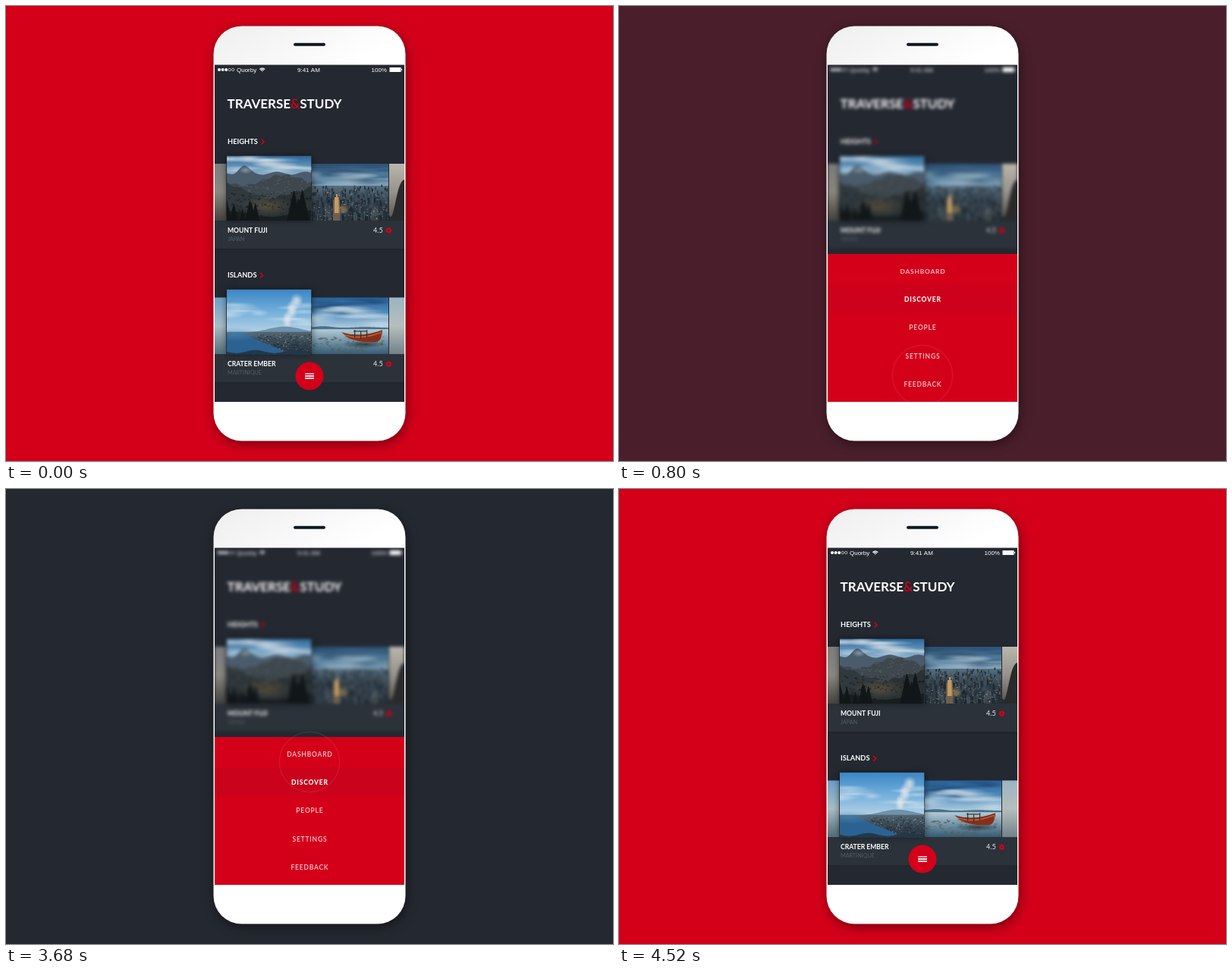
Animation of 800 by 600 pixels, one loop 6.94 s. Source, as an HTML page with a canvas:

```html
<!DOCTYPE html>
<html lang="en">
<head>
<meta charset="utf-8">
<title>Travel app menu</title>
<style>
html, body { margin: 0; width: 100%; height: 100%; overflow: hidden; background: #d4001a; }
canvas { display: block; width: 800px; height: 600px; }
</style>
</head>
<body>
<canvas id="stage" width="800" height="600"></canvas>
<script>
const LOOP = 6940, OPEN_AT = 160, TAP_AT = 3040, CLOSE_AT = 3740, SPAN = 680;
const RED = '#d4001a', DARK = '#242830', WHITE = '#fff';
const SCREEN = { x: 275, y: 77.5, w: 250, h: 444.5 };
const PANEL_TOP = 327;
const BUTTON = { x: 400, y: 488, r: 18.5 };
const ITEMS = ['DASHBOARD', 'DISCOVER', 'PEOPLE', 'SETTINGS', 'FEEDBACK'];
const FONT = 'Lato, "Open Sans", sans-serif';
const STATUS_FONT = '"Liberation Sans", Arial, sans-serif';

const stage = document.getElementById('stage').getContext('2d');
const clamp = v => Math.max(0, Math.min(1, v));
const mix = (a, b, p) => a + (b - a) * p;
const easeOut = (p, power) => 1 - (1 - clamp(p)) ** power;
const bump = (x, center, width) => Math.exp(-(((x - center) / width) ** 2));

function seeded(seed) {
  return () => (seed = (seed * 16807) % 2147483647) / 2147483647;
}

function layer(paint) {
  const canvas = document.createElement('canvas');
  canvas.width = 800;
  canvas.height = 600;
  paint(canvas.getContext('2d'));
  return canvas;
}

function text(c, str, x, y, size, color, weight = 700, family = FONT) {
  c.font = `${weight} ${size}px ${family}`;
  c.fillStyle = color;
  c.fillText(str, x, y);
  return x + c.measureText(str).width;
}

function disc(c, x, y, r, color) {
  c.fillStyle = color;
  c.beginPath();
  c.arc(x, y, r, 0, Math.PI * 2);
  c.fill();
}

function ring(c, x, y, r, width, color, from = 0, to = Math.PI * 2) {
  c.strokeStyle = color;
  c.lineWidth = width;
  c.beginPath();
  c.arc(x, y, r, from, to);
  c.stroke();
}

function box(c, { x, y, w, h }) {
  c.beginPath();
  c.rect(x, y, w, h);
}

// Scenery helpers: every photo is built from gradients, ridges and seeded specks.
function fade(c, y, w, h, ...colors) {
  const g = c.createLinearGradient(0, y, 0, y + h);
  colors.forEach((color, i) => g.addColorStop(i / (colors.length - 1), color));
  c.fillStyle = g;
  c.fillRect(0, y, w, h);
}

function soft(c, x, y, rx, ry, rgb, alpha = .8) {
  c.save();
  c.translate(x, y);
  c.scale(rx, ry);
  const g = c.createRadialGradient(0, 0, 0, 0, 0, 1);
  g.addColorStop(0, `rgba(${rgb},${alpha})`);
  g.addColorStop(1, `rgba(${rgb},0)`);
  disc(c, 0, 0, 1, g);
  c.restore();
}

function clouds(c, seed, count, w, top, bottom, rgb) {
  const random = seeded(seed);
  for (let i = 0; i < count; i++) {
    soft(c, random() * w, mix(top, bottom, random()), 14 + random() * 22, 2 + random() * 4, rgb, .55);
  }
}

function ridge(c, w, h, color, heightAt) {
  c.fillStyle = color;
  c.beginPath();
  c.moveTo(0, h);
  for (let x = 0; x <= w; x++) c.lineTo(x, heightAt(x));
  c.lineTo(w, h);
  c.fill();
}

function specks(c, seed, count, w, topAt, h, rgb, size = 1) {
  const random = seeded(seed);
  for (let i = 0; i < count; i++) {
    const x = random() * w, top = topAt(x);
    c.fillStyle = `rgba(${rgb},${.2 + random() * .45})`;
    c.fillRect(x, mix(top, h, random()), size + random() * size, size);
  }
}

function mountains(c, w, h) {
  const peak = x => 23 + 2 * Math.sin(x / 6) - 9 * bump(x, 22, 9);
  const middle = x => 32 - 7 * Math.cos((x - 75) / 17) + 1.2 * Math.sin(x / 2.7);
  const leftSlope = x => 36 + x * .4 + 1.5 * Math.sin(x / 4);
  const rightSlope = x => 72 - x * .27 + 1.5 * Math.sin(x / 3);
  fade(c, 0, w, 34, '#2b6699', '#6d9dc0', '#b3c5cf');
  clouds(c, 23, 16, w, 3, 24, '222,229,233');
  ridge(c, w, h, '#4a5c6c', peak);
  soft(c, 25, 19, 9, 5, '175,186,194', .6);
  ridge(c, w, h, '#3d474d', middle);
  specks(c, 5, 150, w, middle, 62, '130,138,138');
  ridge(c, w, h, '#30393d', leftSlope);
  ridge(c, w, h, '#2b3234', rightSlope);
  soft(c, 52, 66, 34, 13, '104,92,68', .7);
  specks(c, 9, 160, w, () => 48, h, '15,20,22', 1.5);
  ridge(c, w, h, '#191f20', x => 81 - 9 * bump(x, w, 30) - 8 * bump(x, 8, 28));
  const random = seeded(31);
  for (let i = 0; i < 14; i++) {
    const x = i % 2 ? w - 26 * random() : 40 * random();
    const top = mix(i % 2 ? 42 : 56, 72, random());
    ridge(c, w, h, '#111719', px => Math.min(h, top + Math.abs(px - x) * 4.5));
  }
}

function city(c, w, h) {
  fade(c, 0, w, 32, '#2b5076', '#54809f', '#8eabbd');
  clouds(c, 15, 12, w, 2, 26, '43,76,108');
  clouds(c, 61, 7, w, 14, 27, '168,190,204');
  fade(c, 29, w, h - 29, '#566f80', '#2f3e4b', '#1b242d');
  const random = seeded(47);
  for (let i = 0; i < 260; i++) {
    const depth = i / 260, shade = 25 + random() * 42;
    c.fillStyle = `rgb(${shade},${shade + 13},${shade + 23})`;
    c.fillRect(random() * w, 31 + depth * 42 - random() * 4, 1.5 + depth * 2.5, 3 + depth * 11);
  }
  specks(c, 12, 170, w, () => 34, h, '213,181,132');
  for (let i = 0; i < 3; i++) {
    c.fillStyle = i ? '#c49b62' : '#6e604f';
    c.fillRect(28 + i * 2, 48 - i * 4, 9 - i * 3.5, 27 - i * 6);
  }
  soft(c, 41, 60, 9, 8, '201,158,92', .6);
}

function volcano(c, w, h) {
  fade(c, 0, w, 60, '#3b86c4', '#75b0dc', '#bdd7e6');
  clouds(c, 19, 13, w, 20, 49, '212,227,236');
  for (let i = 0; i < 8; i++) {
    soft(c, 92 - i * 2 + 2 * Math.sin(i * 2), 13 + i * 4.5, 9 - i * .4, 8, '232,233,235', .65);
  }
  ridge(c, w, h, '#7192ac', x => 57 - 8 * bump(x, 76, 30));
  const coast = x => 58 + Math.max(0, x - 20) * .42;
  fade(c, 56, w, 30, '#536672', '#344451', '#24323d');
  specks(c, 91, 230, w, () => 58, h, '178,174,158');
  specks(c, 17, 180, w, () => 58, h, '25,41,47', 1.5);
  ridge(c, w, h, '#2c6291', coast);
  soft(c, 10, 59, 38, 9, '82,138,180', .6);
  ridge(c, w, h, '#22384a', x => 82 + 2 * Math.sin(x / 8));
}

function boat(c, w, h) {
  fade(c, 0, w, 43, '#265f97', '#538fc0', '#bed6e2');
  clouds(c, 37, 12, w, 1, 20, '28,70,113');
  clouds(c, 73, 15, w, 12, 37, '207,222,231');
  ridge(c, w, 43, '#4a7188', x => 40 - 2 * bump(x, 15, 15) - bump(x, 70, 18));
  fade(c, 42, w, h - 42, '#b4cbd6', '#7193a7', '#355a72');
  specks(c, 29, 90, w, () => 51, h, '90,88,74', 2);
  soft(c, 69, 62, 30, 5, '37,48,52');
  for (let i = 0; i < 3; i++) {
    const y = 46 + i * 2;
    c.fillStyle = ['#70301f', '#cc5729', '#81321f'][i];
    c.beginPath();
    c.moveTo(39 + i * 2, y);
    c.quadraticCurveTo(64, y + 8, 93 - i, y - 3);
    c.quadraticCurveTo(93, 58, 83, 59);
    c.quadraticCurveTo(56, 60, 39 + i * 2, y);
    c.fill();
  }
  c.fillStyle = '#352e2c';
  for (let i = 0; i < 3; i++) c.fillRect(56 + i * 8, 43 + i % 2 * 2, 1.2, 10);
  c.fillRect(55, 44, 18, 1.2);
}

const sliver = (...colors) => (c, w, h) => fade(c, 0, w, h, ...colors);

function rockSliver(c, w, h) {
  fade(c, 0, w, h, '#b9b6ad', '#96928a', '#56514b');
  ridge(c, w, h, '#292a2b', x => 20 + 50 * bump(x, 2, 9));
}

function photo(c, area, paint, raised = false) {
  c.save();
  if (raised) {
    c.shadowColor = 'rgba(0,0,0,.55)';
    c.shadowBlur = 9;
    box(c, area);
    c.fillStyle = DARK;
    c.fill();
    c.shadowColor = 'transparent';
  }
  box(c, area);
  c.clip();
  c.translate(area.x, area.y);
  paint(c, area.w, area.h);
  c.restore();
}

function chevron(c, x, y) {
  c.strokeStyle = RED;
  c.lineWidth = 1.5;
  c.beginPath();
  c.moveTo(x, y - 3.5);
  c.lineTo(x + 3.7, y);
  c.lineTo(x, y + 3.5);
  c.stroke();
}

function row(c, top, info) {
  const bottom = top + 85.5, side = { y: top + 10.5, h: 75 };
  const headingEnd = text(c, info.heading, 292, top - 15.5, 9.3, WHITE);
  chevron(c, headingEnd + 4.5, top - 18.5);
  c.save();
  c.shadowColor = 'rgba(0,0,0,.25)';
  c.shadowBlur = 5;
  c.fillStyle = '#2b3239';
  c.fillRect(275, bottom, 250, 37);
  c.restore();
  photo(c, { ...side, x: 275, w: 15.5 }, info.left);
  photo(c, { ...side, x: 403, w: 101 }, info.next);
  photo(c, { ...side, x: 505, w: 20 }, info.right);
  photo(c, { x: 291, y: top, w: 111.5, h: 85.5 }, info.main, true);
  text(c, info.name, 292, bottom + 16, 8.6, WHITE);
  text(c, info.place, 292, bottom + 27, 7.2, '#555d65', 400);
  text(c, '4.5', 484, bottom + 16.2, 9.2, '#e8e9ea', 400);
  disc(c, 504.5, bottom + 13, 3.5, RED);
  disc(c, 504.5, bottom + 13, 1.2, '#571924');
}

function statusBar(c) {
  for (let i = 0; i < 5; i++) {
    const x = 281 + i * 4.55;
    if (i < 3) disc(c, x, 84, 2, WHITE);
    else ring(c, x, 84, 1.7, .6, WHITE);
  }
  text(c, 'Quorby', 304, 87, 8, WHITE, 400, STATUS_FONT);
  text(c, '9:41 AM', 384, 87, 8, WHITE, 400, STATUS_FONT);
  text(c, '100%', 481.5, 87, 8, WHITE, 400, STATUS_FONT);
  for (let i = 0; i < 3; i++) {
    ring(c, 337.7, 86.7, .6 + i * 2, 1.2, WHITE, -Math.PI * .77, -Math.PI * .23);
  }
  c.fillStyle = WHITE;
  c.fillRect(505.5, 81, 15, 6);
  c.fillRect(521, 82.8, 1, 2.4);
}

const screen = layer(c => {
  box(c, SCREEN);
  c.fillStyle = DARK;
  c.fill();
  statusBar(c);
  let x = text(c, 'TRAVERSE', 291.5, 135, 17, WHITE);
  x = text(c, '&', x, 135, 17, RED, 600);
  text(c, 'STUDY', x, 135, 17, WHITE);
  row(c, 197.5, {
    heading: 'HEIGHTS', name: 'MOUNT FUJI', place: 'JAPAN', main: mountains, next: city,
    left: sliver('#7b7e7e', '#8b8880', '#45433f'), right: rockSliver
  });
  row(c, 373.7, {
    heading: 'ISLANDS', name: 'CRATER EMBER', place: 'MARTINIQUE', main: volcano, next: boat,
    left: sliver('#6b9fc5', '#a9bdc7', '#536b7a'),
    right: sliver('#9cb4c0', '#b5bebe', '#728188')
  });
});

const phone = layer(c => {
  const shine = c.createLinearGradient(285, 25, 350, 140);
  shine.addColorStop(0, '#efeff0');
  shine.addColorStop(1, WHITE);
  c.shadowColor = 'rgba(0,0,0,.45)';
  c.shadowBlur = 15;
  c.shadowOffsetX = 1.5;
  c.shadowOffsetY = 4;
  c.fillStyle = shine;
  c.beginPath();
  c.roundRect(273.5, 26.5, 253, 547, 37);
  c.fill();
  c.shadowColor = 'transparent';
  c.fillStyle = '#101722';
  c.beginPath();
  c.roundRect(379, 48.7, 42, 4, 2);
  c.fill();
});

// Position on the opening timeline; closing runs it backwards.
function menuTime(t) {
  if (t < CLOSE_AT) return SPAN * clamp((t - OPEN_AT) / SPAN);
  return SPAN * (1 - clamp((t - CLOSE_AT) / 500) ** 1.3);
}

function backdrop(t) {
  const opening = clamp((t - OPEN_AT) / 800) ** 1.1;
  const closing = clamp((t - CLOSE_AT) / 780) ** 1.1;
  const p = opening - closing;
  return `rgb(${mix(212, 36, p)},${mix(0, 40, p)},${mix(26, 48, p)})`;
}

function drawItem(c, label, i, m) {
  const startY = 485 + 3 * Math.ceil(i / 2);
  const y = mix(startY, 349.7 + i * 37.35, easeOut(m / SPAN, 3));
  const size = easeOut((m - 140 - 57 * (4 - i)) / 300, 2);
  c.globalAlpha = clamp((.7 - size) / .3);
  c.fillStyle = WHITE;
  c.fillRect(394, y - .7, 12, 1.3);
  c.globalAlpha = 1;
  if (size < .02) return;
  const active = label === 'DISCOVER';
  c.save();
  c.translate(400.4, y);
  c.scale(size, size);
  c.textAlign = 'center';
  c.letterSpacing = '0.8px';
  text(c, label, 0, 3, 8.5, active ? WHITE : 'rgba(255,255,255,.82)', active ? 800 : 600);
  c.restore();
}

function drawMenu(c, m) {
  c.save();
  box(c, { ...SCREEN, y: PANEL_TOP });
  c.clip();
  const radius = mix(BUTTON.r, 204.5, easeOut(m / SPAN, 2));
  disc(c, BUTTON.x, BUTTON.y, radius, RED);
  c.fillStyle = `rgba(36,40,48,${.05 * clamp((m - 500) / 180)})`;
  c.fillRect(275, 368, 250, 37);
  ITEMS.forEach((label, i) => drawItem(c, label, i, m));
  c.restore();
}

function drawTap(c, elapsed, y) {
  if (elapsed < 0 || elapsed >= SPAN) return;
  const p = (elapsed + 20) / SPAN, r = 25 + 15 * p;
  const fill = .5 * clamp(Math.min(p, .5 - p) / .25);
  const line = clamp(Math.min((p - .2) / .25, (1 - p) / .4));
  disc(c, 400, y, r, `rgba(255,255,255,${fill})`);
  ring(c, 400, y, r, 1.6, `rgba(255,255,255,${line})`);
}

function draw(t) {
  const c = stage, m = menuTime(t);
  c.fillStyle = backdrop(t);
  c.fillRect(0, 0, 800, 600);
  c.drawImage(phone, 0, 0);
  c.save();
  box(c, SCREEN);
  c.clip();
  c.fillStyle = DARK;
  c.fill();
  const blur = 2.2 * (m / SPAN) ** 2;
  if (blur > .05) c.filter = `blur(${blur}px)`;
  c.drawImage(screen, 0, 0);
  c.filter = 'none';
  drawMenu(c, m);
  drawTap(c, t - OPEN_AT, 487);
  drawTap(c, t - TAP_AT, 360);
  c.restore();
}

const began = performance.now();
function tick() {
  draw((performance.now() - began) % LOOP);
  requestAnimationFrame(tick);
}
tick();
</script>
</body>
</html>
```
